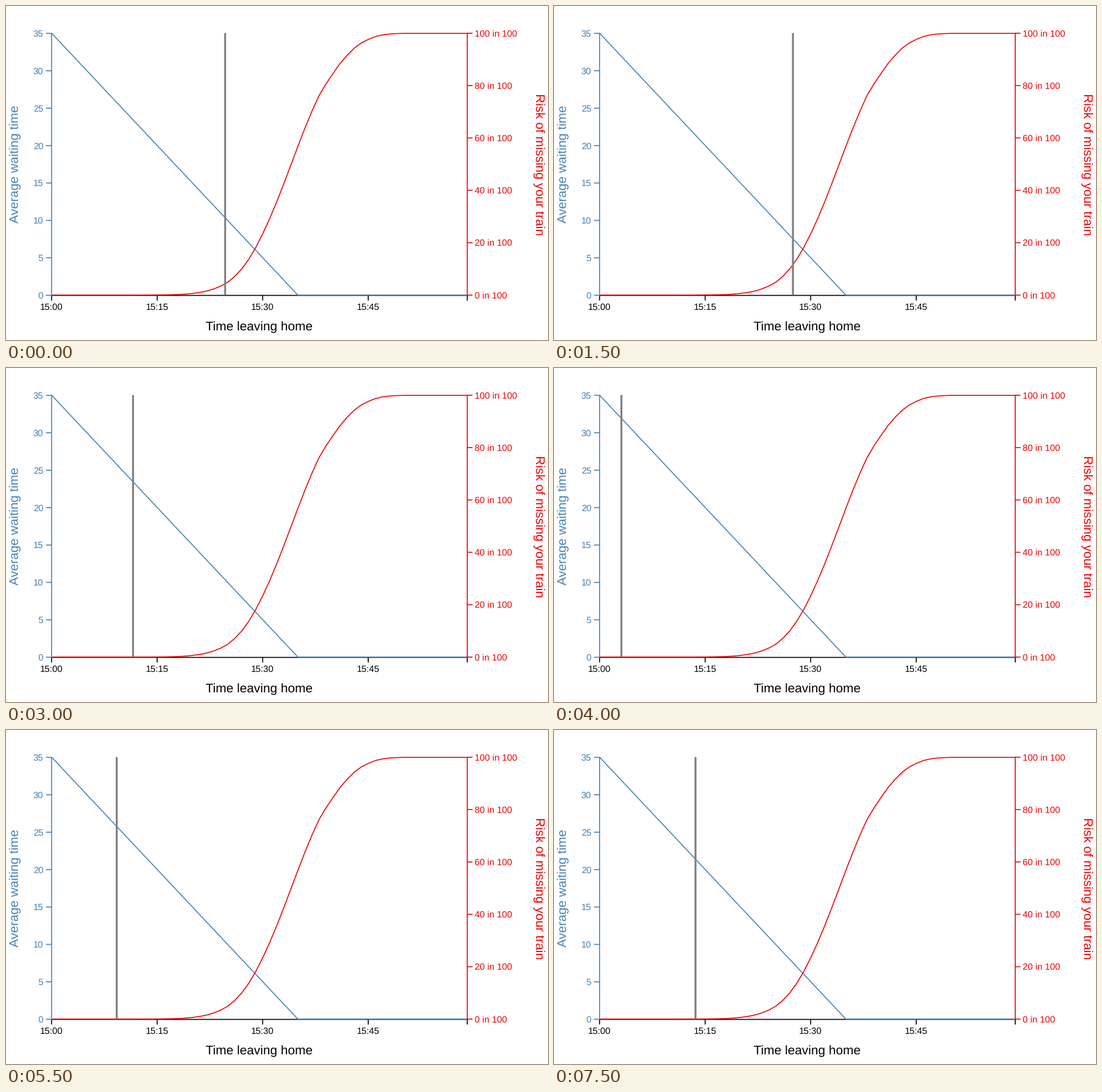
Write a matplotlib script that moves like this. It is 953 px wide and 588 px high and loops after 8000 ms.

```python
import math

import matplotlib.pyplot as plt
import numpy as np
from matplotlib.animation import FuncAnimation

W, H, DPI = 953, 588, 100
PX = 72 / DPI  # points per pixel
BLUE, RED, GREY = "steelblue", "#f00000", "#808080"
LEFT, RIGHT, TOP, BASE = 80.2, 811, 48.2, 509.2
MINUTE = 12.37
THIN = 1.7

plt.rcParams.update({
    "font.family": "Liberation Sans",
    "text.hinting": "none",
    "path.snap": False,
})

# the small margin keeps float rounding from losing a pixel
fig = plt.figure(figsize=((W + 0.01) / DPI, (H + 0.01) / DPI), dpi=DPI,
                 facecolor="white")
ax = fig.add_axes([0, 0, 1, 1])
ax.set_xlim(0, W)
ax.set_ylim(H, 0)
ax.axis("off")


def line(xs, ys, color, width=THIN, z=2):
    return ax.plot(xs, ys, color=color, lw=width * PX, zorder=z,
                   solid_capstyle="butt", solid_joinstyle="miter")[0]


def label(x, y, text, color, size=16, ha="center", va="baseline", angle=0):
    ax.text(x, y, text, color=color, fontsize=size * PX, ha=ha, va=va,
            rotation=angle, rotation_mode="anchor")


def x_at(minute):
    return LEFT + MINUTE * minute


def y_at(share):
    return BASE - (BASE - TOP) * share


def normal_cdf(z):
    return 0.5 * (1 + math.erf(z / math.sqrt(2)))


# bottom axis
line([LEFT, RIGHT], [509.5] * 2, "black")
for m in (0, 15, 30, 45, (RIGHT - LEFT) / MINUTE):
    line([x_at(m)] * 2, [509.5, 518.5], "black")
    if m <= 45:
        label(x_at(m) - 0.3, 534.8, f"15:{m:02d}", "black")
label(445, 571, "Time leaving home", "black", 22.4)

# curves
minutes = np.append(np.arange(59), (RIGHT - LEFT) / MINUTE)
wait = np.maximum(35 - minutes, 0) / 35
score = np.interp(minutes,
                  [0, 15, 20, 25, 30, 34, 38, 40, 42, 45, 47, 50],
                  [-6, -3.4, -2.5, -1.66, -.726, -.01, .71, 1.02, 1.375,
                   1.98, 2.48, 3.2])
risk = np.array([normal_cdf(s) for s in score])
line(x_at(minutes), y_at(wait) - 0.3, BLUE, z=3)
line(x_at(minutes), y_at(risk) - 0.3, RED, z=4)

# left axis
line([LEFT] * 2, [TOP - 0.8, BASE + 0.8], BLUE, z=5)
for v in range(0, 36, 5):
    y = y_at(v / 35)
    line([70.3, LEFT], [y, y], BLUE, z=5)
    label(65.6, y + 5.6, str(v), BLUE, ha="right")
label(22.3, 278.5, "Average waiting time", BLUE, 22.4, angle=90)

# right axis
line([RIGHT] * 2, [TOP - 0.8, BASE + 0.8], RED, z=5)
for v in range(0, 101, 20):
    y = y_at(v / 100) - 0.3
    line([RIGHT, 820.3], [y, y], RED, z=5)
    label(824, y + 5.6, f"{v} in 100", RED, ha="left")
label(931, 278.5, "Risk of missing your train", RED, 22.4, angle=-90)

# hand-dragged cursor, one stop per step
STOPS = [385.3, 423.5, 496.7, 420.1, 358.5, 306.2, 223.4, 146.6,
         118.5, 99.4, 140.9, 194.7, 133.5, 181.8, 212.9, 248.8]
cursor = line([STOPS[0]] * 2, [47.6, 508.8], GREY, 3.4, z=6)


def update(i):
    cursor.set_xdata([STOPS[i]] * 2)
    return [cursor]


anim = FuncAnimation(fig, update, frames=len(STOPS), interval=500,
                     repeat=True, repeat_delay=0)
plt.show()
```
